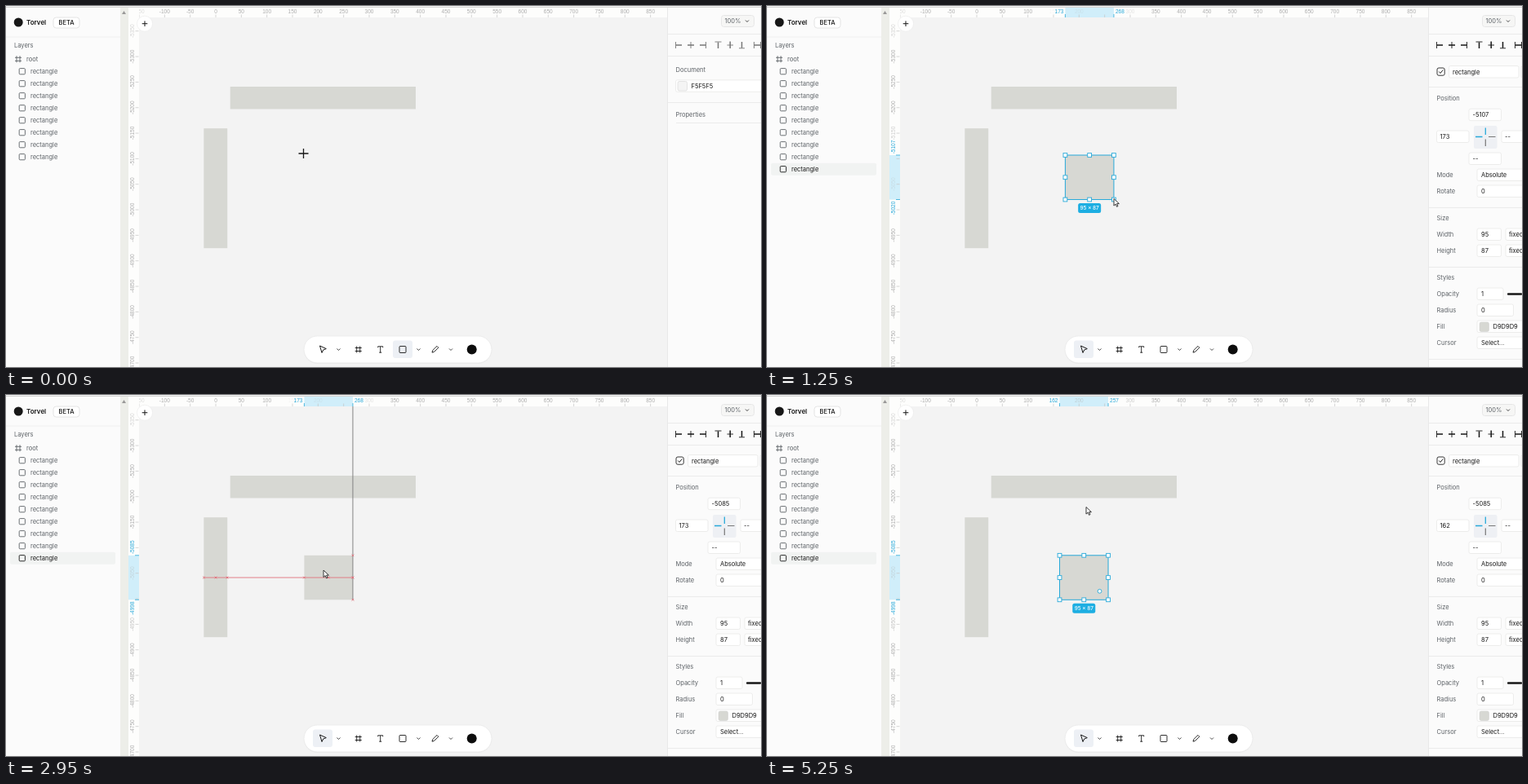
An HTML page that plays this animation: 925 px wide and 443 px high, repeating every 5.3 s.

```html
<!DOCTYPE html>
<html lang="en">
<head>
<meta charset="utf-8">
<title>Drawing editor</title>
<style>
  html, body { margin: 0; width: 100%; height: 100%; overflow: hidden; background: #f3f3f3; }
  svg { display: block; width: 925px; height: 443px; font: 7.5px Inter, sans-serif; }
  .ruler { font: 6.5px "Liberation Sans", Arial, sans-serif; text-anchor: middle; }
</style>
</head>
<body>
<svg viewBox="0 0 925 443">
  <g id="stage"></g>
  <g id="bars"></g>
  <g id="panels"></g>
  <g id="pointer"></g>
</svg>
<script>
const LOOP = 5300, STEP = 50, SCALE = 0.6266;
const BLUE = '#28a9d9', RED = '#e0717c', SHAPE = '#d7d8d3', INK = '#171717', GREY = '#5c6166';
const DRAW = 300, SELECT = 1450, GRAB = 2100, DROP = 4850;
const $ = id => document.getElementById(id);

// World units to stage pixels
const px = u => 257 + u * SCALE;
const py = v => 183 + (v + 5107) * SCALE;

const rect = (x, y, w, h, fill, more = '') =>
  `<rect x="${x}" y="${y}" width="${w}" height="${h}" fill="${fill}" ${more}/>`;
const path = (d, stroke, width = 1, more = '') =>
  `<path d="${d}" fill="none" stroke="${stroke}" stroke-width="${width}" ${more}/>`;
const text = (x, y, s, fill = INK, more = '') =>
  `<text x="${x}" y="${y}" fill="${fill}" ${more}>${s}</text>`;
const field = (x, y, w, s = '', tx = x + 5) =>
  rect(x, y - 7.5, w, 14.5, '#fff', 'rx="2" stroke="#e9e9e8" stroke-width=".8"') + text(tx, y + 2.7, s);
const rule = y => path(`M811 ${y}H925`, '#ebebeb');
const chevron = (x, y) => path(`M${x - 2} ${y - 1}l2 2 2-2`, '#333', .9);
const hash = (x, y, color) =>
  path(`M${x - 2} ${y - 4}v8M${x + 2} ${y - 4}v8M${x - 4} ${y - 2}h8M${x - 4} ${y + 2}h8`, color, .9);
const arrow = (x, y, fill) =>
  `<path d="M${x} ${y}v8.6l2.1-2 1.4 3.2 1.5-.7-1.4-3h2.8z" fill="${fill}" stroke="#222" stroke-width=".9" stroke-linejoin="round"/>`;

// Linear interpolation between [time, ...values]
function at(t, keys) {
  const i = keys.findIndex(k => k[0] > t);
  if (i < 0) return keys[keys.length - 1].slice(1);
  if (!i) return keys[0].slice(1);
  const a = keys[i - 1], b = keys[i], p = (t - a[0]) / (b[0] - a[0]);
  return a.slice(1).map((v, j) => v + (b[j + 1] - v) * p);
}

const sizeKeys = [[250, 0, 0], [700, 82, 55], [1150, 95, 87]];
const placeKeys = [[2100, 173, -5107], [2450, 173, -5099], [2900, 173, -5085], [3100, 173, -5085],
  [3400, 165, -5085], [3650, 165, -5085], [4200, 157, -5085], [4400, 157, -5085], [4650, 162, -5085]];
const mouseKeys = [[250, 364.5, 181], [300, 367, 187], [700, 418.5, 218.5], [1150, 425, 236.5],
  [1450, 425, 236.5], [1900, 389, 201], [2100, 389, 201], [2450, 389, 206], [2900, 389, 215],
  [3100, 389, 215], [3400, 382, 215], [3650, 382, 215], [4200, 378.5, 215], [4400, 378.5, 215],
  [4650, 382, 215], [4850, 382, 215], [5200, 391, 137.5]];

function stateAt(t) {
  const [w, h] = at(t, sizeKeys).map(Math.round);
  const [x, y] = at(t, placeKeys).map(Math.round);
  return { t, x, y, w, h, live: t >= DRAW, moving: t >= GRAB && t < DROP, mouse: at(t, mouseKeys) };
}

const cross = (x, y) => path(`M${x - 1.3} ${y - 1.3}l2.6 2.6m0-2.6l-2.6 2.6`, RED, .9);

function guides(s, l, t, r, b) {
  const cx = (l + r) / 2, cy = (t + b) / 2;
  let out = '';
  const column = (x, top, ys, color = RED) =>
    out += path(`M${x} ${top}V${b}`, color, .9) + ys.map(y => cross(x, y)).join('');
  if (s.x === 173) column(r, 14, [t, cy, b], '#777');
  if (s.x === 165) column(l, 14, [t, cy, b]);
  if (s.x === 162) column(cx, 99, [99, 113, 126.5, t, cy, b]);
  if (s.y === -5085)
    out += path(`M242.5 ${cy}H${r}`, RED, .9) + [242.5, 257, 271, l, cx, r].map(x => cross(x, cy)).join('');
  return out;
}

function selection(s, l, t, r, b) {
  const cx = (l + r) / 2, cy = (t + b) / 2;
  let out = rect(l, t, r - l, b - t, 'none', `stroke="${BLUE}"`);
  for (const x of [l, cx, r]) for (const y of [t, cy, b])
    if (x !== cx || y !== cy) out += rect(x - 2.4, y - 2.4, 4.8, 4.8, '#fff', `stroke="${BLUE}" stroke-width=".9"`);
  if (s.t >= SELECT)
    out += `<circle cx="${r - 10.5}" cy="${b - 10.5}" r="2.4" fill="#fff" stroke="${BLUE}" stroke-width=".9"/>`;
  return out + rect(cx - 14, b + 4.5, 28, 12, '#1daee2', 'rx="2.5"') +
    text(cx, b + 12.8, `${s.w} × ${s.h}`, '#fff', 'font-size="6.4" font-weight="500" text-anchor="middle"');
}

function rulers(s, l, t, r, b) {
  const fade = (p, lo, hi) => !s.live ? 1 :
    Math.max(0, Math.min(1, (Math.min(Math.abs(p - lo), Math.abs(p - hi)) - 12) / 25));
  const turned = (y, label, color, more = '') =>
    text(0, 0, label, color, `transform="translate(156.5 ${y}) rotate(-90)" ${more}`);
  let out = rect(150, 2, 661, 12, '#fdfdfc') + rect(150, 14, 13, 429, '#fdfdfc');
  if (s.live) out += rect(l, 2, r - l, 12, '#d0eefa') + rect(150, t, 13, b - t, '#d0eefa');
  for (let u = -150; u <= 850; u += 50) {
    const x = px(u), o = u === -150 ? .4 : fade(x, l, r);
    out += text(x, 8.5, u, '#adadad', `opacity="${o}"`) + path(`M${x} 10.5v3.5`, '#c4c4c4', .7);
  }
  for (let v = -5350; v <= -4700; v += 50) {
    const y = py(v), o = v === -5350 ? .5 : fade(y, t, b);
    out += turned(y, v, '#adadad', `opacity="${o}"`) + path(`M158.5 ${y}h4`, '#c4c4c4', .7);
  }
  if (s.live) {
    out += text(l - 2, 8.5, s.x, BLUE, 'text-anchor="end"') +
      text(r + 2, 8.5, s.x + s.w, BLUE, 'text-anchor="start"') +
      turned(t - 10, s.y, BLUE) + turned(b + 10.5, s.y + s.h, BLUE) +
      path(`M${l} 10v4M${r} 10v4M158 ${t}h5M158 ${b}h5`, BLUE, .8);
  }
  return `<g class="ruler">${out}</g>` + rect(150, 2, 13, 12, '#fdfdfc');
}

function leftPanel(live) {
  let out = rect(0, 0, 140, 443, '#fbfbfb') + rect(140, 0, 10, 443, '#edeee9') +
    '<path d="M142 10l2.5-4 2.5 4z" fill="#999"/>' +
    `<circle cx="15.2" cy="20" r="5.5" fill="${INK}"/>` +
    text(25, 23, 'Torvel', INK, 'font-weight="600" font-size="8"') +
    rect(58, 14, 32, 13, '#fff', 'rx="3.5" stroke="#dedede" stroke-width=".8"') +
    text(74, 23, 'BETA', INK, 'font-weight="500" text-anchor="middle"') +
    path('M0 38H140', '#f0f0f0') + text(10, 50.7, 'Layers', GREY) +
    hash(15, 65.3, GREY) + text(25, 68, 'root', GREY);
  for (let i = 0; i < (live ? 9 : 8); i++) {
    const y = 80.3 + i * 15, color = i === 8 ? INK : GREY;
    if (i === 8) out += rect(5, y - 7.5, 129, 15, '#f1f3f2', 'rx="2"');
    out += rect(16.2, y - 3.7, 7.2, 7.2, 'none', `rx="1" stroke="${color}" stroke-width=".9"`) +
      text(30, y + 2.7, 'rectangle', color);
  }
  return out;
}

function alignIcons(color) {
  const bar = (d, w) => path(d, color, w);
  return bar('M820.5 44v8M839 44v8M857.5 44v8M883.5 48h7.5M916.5 44v8M924.5 44v8', .9) +
    bar('M821 48h7M835 48h8M850 48h7M872.5 44.5v7.5M887.2 43.5v8.5M901.5 44v7.5M917 48h7', 1.5) +
    bar('M868.5 44h8M898 51.8h7', .9);
}

function properties(s) {
  const label = (y, name) => text(820.5, y + 2.7, name, GREY);
  return rect(821, 76, 9.2, 9.2, '#fff', 'rx="2" stroke="#222" stroke-width=".9"') +
    path('M823.2 80.5l1.8 2 3.2-4', '#222') +
    field(835.5, 81, 85.5, 'rectangle', 840) + field(924, 81, 10) + rule(99.5) +
    label(113.5, 'Position') + field(860, 133.7, 39.5, s.y, 864.5) +
    field(820.5, 160.5, 39.5, s.x, 824.5) + field(900, 160.5, 40, '--', 904) + field(860, 187.5, 39.5, '--', 864.5) +
    rect(866, 147, 28.5, 28, '#eef0f4', 'rx="2"') +
    path('M868 160.5h8.5M880.3 149.5v8.5', BLUE, 1.3) + path('M884 160.5h8.5M880.3 163.5v8.5', '#777', 1.2) +
    label(207.5, 'Mode') + field(870, 207.5, 65, 'Absolute') +
    label(227.5, 'Rotate') + field(870, 227.5, 65, 0) + rule(247.5) +
    label(260.5, 'Size') +
    label(280.5, 'Width') + field(870, 280.5, 29.5, s.w) + field(905, 280.5, 30, 'fixed', 909) +
    label(300.5, 'Height') + field(870, 300.5, 29.5, s.h) + field(905, 300.5, 30, 'fixed', 909) + rule(320.5) +
    label(333.5, 'Styles') +
    label(353.5, 'Opacity') + field(870, 353.5, 32, 1) + rect(907, 352.3, 18, 2.4, INK, 'rx="1"') +
    label(373.5, 'Radius') + field(870, 373.5, 44.5, 0) +
    label(393.5, 'Fill') + field(870, 393.5, 65, 'D9D9D9', 889.5) +
    rect(873, 388, 11.5, 11.5, SHAPE, 'rx="2" stroke="#ccc" stroke-width=".5"') +
    label(413.5, 'Cursor') + field(870, 413.5, 65, 'Select...') + rule(433.5);
}

function rightPanel(s) {
  const plain = text(820.5, 80.5, 'Document', GREY) + field(820.5, 98.3, 120, 'F5F5F5', 839.5) +
    rect(823, 92.5, 11.5, 11.5, '#f4f4f4', 'rx="2" stroke="#ddd" stroke-width=".8"') +
    rule(118.5) + text(820.5, 136, 'Properties', GREY) + path('M821 143.5H925', '#ebebeb');
  return rect(811, 2, 114, 441, '#fbfbfb') + path('M810.5 2V443', '#e8e8e8') +
    rect(876.5, 11.5, 40, 14, '#f6f6f5', 'rx="3" stroke="#e2e2e2" stroke-width=".8"') +
    text(880.5, 21, '100%', GREY) + chevron(908, 18.5) + rule(34.5) +
    alignIcons(s.live ? INK : '#777') + rule(61.5) + (s.live ? properties(s) : plain);
}

function toolbar(live) {
  return rect(365, 406, 230, 33, '#000', 'rx="16.5" opacity=".035"') +
    rect(365, 405, 230, 33, '#fff', 'rx="16.5" stroke="#e9e9e9" stroke-width=".8"') +
    rect(live ? 376 : 474, 410.5, 24, 21.5, '#edf0f5', 'rx="3"') +
    path('M384.5 417l2.5 8.5 1.7-3.5 3.6-1.4z', INK, 1, 'stroke-linejoin="round"') +
    hash(431.7, 421.5, INK) +
    path('M455.7 419.2v-1.4h6v1.4M458.7 418v7.2M457.2 425.2h3', INK, .9) +
    rect(482, 417.5, 8, 8, 'none', `rx="1" stroke="${INK}" stroke-width=".9"`) +
    path('M522 425.2l.7-2.6 5.3-5.2 1.8 1.8-5.3 5.3z', INK, .9) +
    [407.5, 505.5, 545].map(x => chevron(x, 421.5)).join('') +
    `<circle cx="570.7" cy="421.5" r="6" fill="#0d0d0d"/>`;
}

function render(s) {
  const l = px(s.x), t = py(s.y), r = px(s.x + s.w), b = py(s.y + s.h);
  const [mx, my] = s.mouse;
  $('stage').innerHTML = rect(150, 0, 661, 443, '#f3f3f3') +
    rect(274.7, 99, 227.3, 27.5, SHAPE) + rect(242.3, 150.2, 28.9, 147, SHAPE) +
    (s.live ? rect(l, t, r - l, b - t, SHAPE) + (s.moving ? guides : selection)(s, l, t, r, b) : '');
  $('bars').innerHTML = rulers(s, l, t, r, b) +
    '<circle cx="170" cy="21.7" r="9.5" fill="#fff" stroke="#e9e9e9" stroke-width=".6"/>' +
    path('M166.7 21.7h6.6M170 18.4v6.6', INK) + toolbar(s.live);
  $('panels').innerHTML = leftPanel(s.live) + rightPanel(s) + rect(0, 0, 925, 1, '#f4f4f4') + rect(0, 1, 925, 1, '#d4d4d2');
  $('pointer').innerHTML = s.live ? arrow(mx, my, '#fff') : path('M358.5 181h12M364.5 175v12', INK, 1.3);
}

const start = performance.now();
let shown = -1;
function tick(now) {
  const t = Math.floor(Math.max(0, now - start) % LOOP / STEP) * STEP;
  if (t !== shown) render(stateAt(shown = t));
  requestAnimationFrame(tick);
}
tick(start);
</script>
</body>
</html>
```
